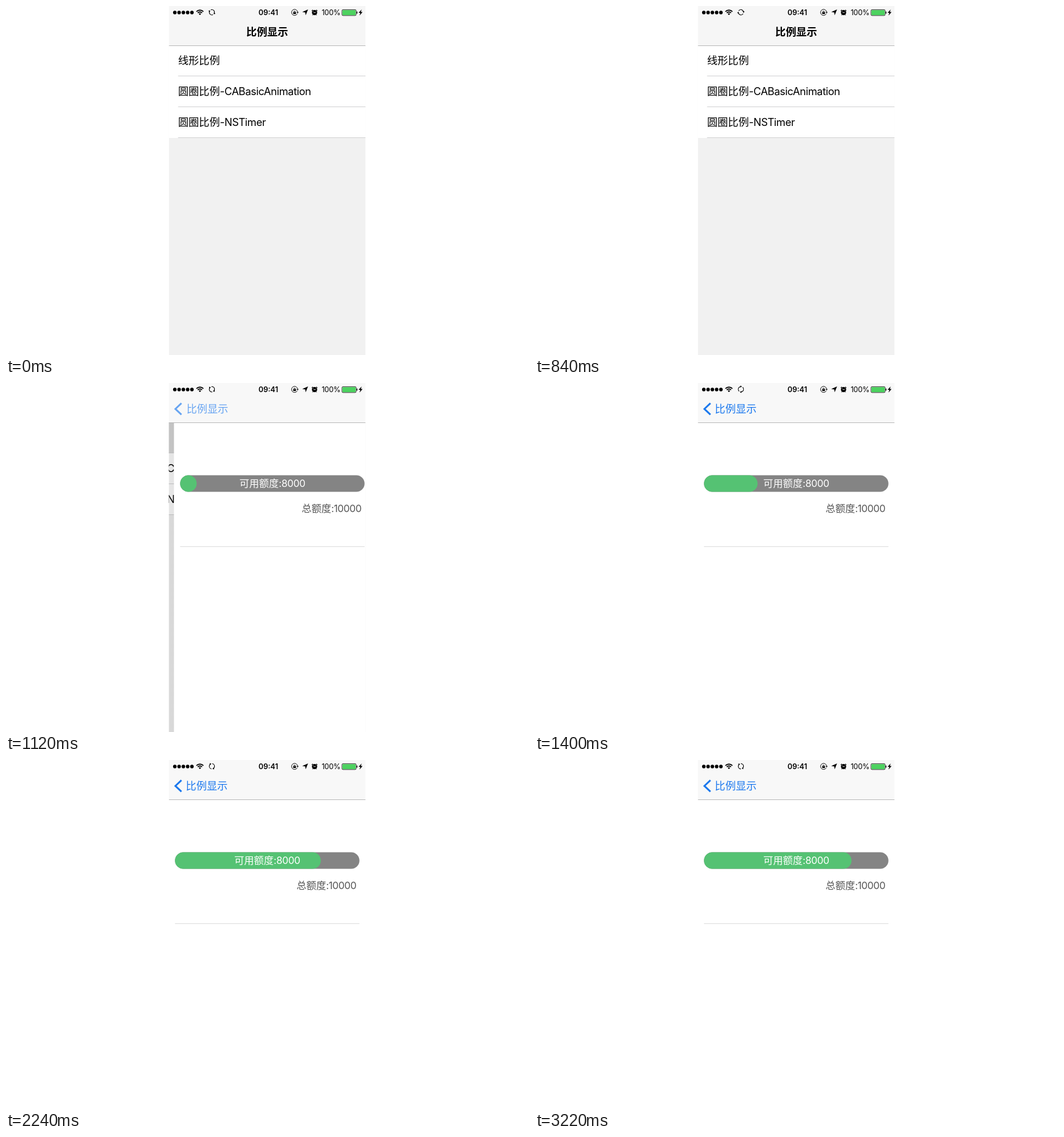
An HTML page with a canvas that plays this animation: 917 by 611 pixels, repeating every 3360 ms.

```html
<!DOCTYPE html>
<html lang="zh-CN">
<head>
<meta charset="utf-8">
<style>
html, body { margin: 0; width: 100%; height: 100%; overflow: hidden; background: #fff; }
canvas { display: block; width: 917px; height: 611px; }
</style>
</head>
<body>
<canvas id="stage"></canvas>
<script>
const W = 917, H = 611, TAU = Math.PI * 2;
const LEFT = 285.5, WIDTH = 345, NAV = 69;
const STEP = 140, COUNT = 24, PUSH = 7, SETTLED = 3;
const FONT = 'Inter, "Noto Sans CJK SC", "Noto Sans CJK", sans-serif';
const BLUE = '#1b78ee', GREEN = '#55c273';
const ROWS = ['线形比例', '圆圈比例-CABasicAnimation', '圆圈比例-NSTimer'];
// Fill width of the bar on each step after the push begins
const FILL = [18, 29, 58, 94, 131, 160, 200, 231, 245.5, 255.7, 258.7];
const BACK_ALPHA = [0.12, 0.65, 0.95, 1];

const canvas = document.getElementById('stage');
const ctx = canvas.getContext('2d');
const dpr = window.devicePixelRatio || 1;
canvas.width = W * dpr;
canvas.height = H * dpr;

const pick = (list, i) => list[Math.min(i, list.length - 1)];

function rect(x, y, w, h, color) {
  ctx.fillStyle = color;
  ctx.fillRect(x, y, w, h);
}

function pill(x, y, w, h, radii, color) {
  ctx.beginPath();
  ctx.roundRect(x, y, w, h, radii);
  ctx.fillStyle = color;
  ctx.fill();
}

function disc(x, y, r, color) {
  ctx.beginPath();
  ctx.arc(x, y, r, 0, TAU);
  ctx.fillStyle = color;
  ctx.fill();
}

function arc(x, y, r, from, to, width) {
  ctx.beginPath();
  ctx.arc(x, y, r, from, to);
  ctx.lineWidth = width;
  ctx.stroke();
}

function poly(points, color) {
  ctx.beginPath();
  points.forEach(([x, y]) => ctx.lineTo(x, y));
  ctx.closePath();
  ctx.fillStyle = color;
  ctx.fill();
}

function line(points, width) {
  ctx.beginPath();
  points.forEach(([x, y]) => ctx.lineTo(x, y));
  ctx.lineWidth = width;
  ctx.stroke();
}

// Latin runs are set a little tighter than Chinese ones; align: 0 left, 0.5 centre, 1 right
function text(str, x, y, size, color, { weight = 400, align = 0, tight = -0.023 } = {}) {
  ctx.font = `${weight} ${size}px ${FONT}`;
  ctx.fillStyle = color;
  const runs = str.match(/[\u4e00-\u9fff]+|[^\u4e00-\u9fff]+/g).map(s => {
    const spacing = s.charCodeAt(0) < 0x4e00 ? `${tight * size}px` : '0px';
    ctx.letterSpacing = spacing;
    return { s, spacing, w: ctx.measureText(s).width };
  });
  x -= align * runs.reduce((sum, run) => sum + run.w, 0);
  for (const run of runs) {
    ctx.letterSpacing = run.spacing;
    ctx.fillText(run.s, x, y);
    x += run.w;
  }
  ctx.letterSpacing = '0px';
}

function spinner(x, y, angle) {
  ctx.save();
  ctx.translate(x, y);
  ctx.rotate(angle);
  for (let i = 0; i < 2; i++) {
    arc(0, 0, 4.6, -1.3, 1.15, 1.2);
    poly([[0.3, 4.6], [2.9, 2.3], [3.2, 5.9]], '#000');
    ctx.rotate(Math.PI);
  }
  ctx.restore();
}

function wifi(x, y) {
  const a = -Math.PI * 0.75, b = -Math.PI * 0.25;
  arc(x, y, 8.6, a, b, 1.9);
  arc(x, y, 5.4, a, b, 1.8);
  ctx.beginPath();
  ctx.moveTo(x, y);
  ctx.arc(x, y, 3, a, b);
  ctx.fillStyle = '#000';
  ctx.fill();
}

function rotationLock(x, y) {
  arc(x, y, 5.3, 0.5, TAU - 0.2, 1);
  poly([[x + 3.4, y - 0.6], [x + 7.2, y - 0.6], [x + 5.3, y + 1.8]], '#000');
  rect(x - 2.4, y - 0.5, 4.8, 3.4, '#000');
  arc(x, y - 0.6, 1.5, Math.PI, TAU, 1);
}

function alarm(x, y) {
  disc(x, y, 4.6, '#000');
  arc(x, y, 5.6, -2.6, -2.1, 1.1);
  arc(x, y, 5.6, -1.04, -0.54, 1.1);
  line([[x - 2.6, y + 3.4], [x - 3.5, y + 4.8]], 1);
  line([[x + 2.6, y + 3.4], [x + 3.5, y + 4.8]], 1);
  ctx.strokeStyle = '#f7f7f7';
  line([[x - 2.4, y - 1.6], [x, y + 0.4], [x + 2.2, y - 0.8]], 0.9);
  ctx.strokeStyle = '#000';
}

function battery(x, y) {
  ctx.beginPath();
  ctx.roundRect(x + 0.4, y + 0.4, 25, 10.4, 2);
  ctx.lineWidth = 0.8;
  ctx.stroke();
  pill(x + 1.3, y + 1.3, 23.2, 8.6, 1, '#4cd25f');
  pill(x + 26, y + 3.6, 1.5, 4, [0, 1.2, 1.2, 0], '#000');
}

function statusBar(n) {
  ctx.strokeStyle = '#000';
  for (let i = 0; i < 5; i++) disc(296 + i * 7.5, 11.4, 3.1, '#000');
  wifi(340, 15.9);
  spinner(361, 11, (n - 1.6) * 24.5 * Math.PI / 180);
  text('09:41', 460, 16, 12.9, '#000', { weight: 600, align: 0.5, tight: 0 });
  rotationLock(506, 11.2);
  poly([[529.6, 6], [525.4, 16.2], [524.6, 11.2], [519.4, 10.6]], '#000');
  alarm(541, 11.5);
  text('100%', 586.4, 16, 12.9, '#000', { align: 1 });
  battery(588.6, 6);
  poly([[623.6, 6], [618.2, 12], [621.2, 12], [619.8, 16.8], [625.2, 10.4], [622.2, 10.4]], '#000');
}

function navBar(n) {
  rect(LEFT, 0, WIDTH, NAV, n < PUSH ? '#f6f6f6' : '#f8f8f8');
  rect(LEFT, NAV, WIDTH, 1, '#b6b6b6');
  const step = n - PUSH;
  if (step < 0) {
    text('比例显示', 458, 52.3, 18.33, '#000', { weight: 700, align: 0.5 });
    return;
  }
  const x = 315.3 + 32.5 * Math.exp(-3.4 * step);
  if (step === 0) {
    ctx.globalAlpha = 0.17;
    text('比例显示', x, 52.3, 18.33, '#000', { weight: 700 });
  }
  ctx.globalAlpha = pick(BACK_ALPHA, step);
  ctx.strokeStyle = BLUE;
  line([[307.6, 35.4], [297, 45.4], [307.6, 55.4]], 3.1);
  text('比例显示', x, 52.3, 18.33, BLUE);
  ctx.globalAlpha = 1;
}

function listPage(shift, selected, dim) {
  const x = LEFT + shift, rowH = 53.9;
  const edge = i => Math.round(NAV + i * rowH);
  rect(x, NAV, WIDTH, H - NAV, '#f1f1f1');
  ROWS.forEach((label, i) => {
    const y = edge(i);
    rect(x, y, WIDTH, edge(i + 1) - y, selected && i === 0 ? '#d9d9d9' : '#fff');
    text(label, x + 16.2, NAV + i * rowH + 33.2, 18.33, '#000');
  });
  ROWS.forEach((_, i) => rect(x + 16.2, edge(i + 1) - 1, WIDTH - 16.2, 1, '#cfcfd0'));
  rect(LEFT, NAV, WIDTH, H - NAV, `rgba(0,0,0,${dim})`);
}

function detailPage(shift, fill) {
  const x = LEFT + shift, bar = x + 10.8, barW = 323.4, y = 161.5, h = 29;
  if (shift > 0) {
    const shade = ctx.createLinearGradient(x - 9, 0, x, 0);
    shade.addColorStop(0, 'rgba(0,0,0,0)');
    shade.addColorStop(1, `rgba(0,0,0,${Math.min(0.07, shift / 1000)})`);
    rect(x - 9, NAV, 9, H - NAV, shade);
  }
  rect(x, NAV, WIDTH, H - NAV, '#fff');
  pill(bar, y, barW, h, h / 2, '#848484');
  pill(bar, y, fill, h, { x: Math.min(h, fill) / 2, y: h / 2 }, GREEN);
  text('可用额度:8000', bar + barW / 2, 182.2, 17.25, '#fff', { align: 0.5 });
  text('总额度:10000', bar + barW - 5.4, 225.7, 17.25, '#555', { align: 1 });
  rect(bar, 286, barW, 1, '#dadada');
}

function draw(n) {
  ctx.setTransform(dpr, 0, 0, dpr, 0, 0);
  rect(0, 0, W, H, '#fff');
  ctx.save();
  ctx.beginPath();
  ctx.rect(LEFT, 0, WIDTH, H);
  ctx.clip();
  const step = n - PUSH;
  const rest = step < 0 ? 1 : step < SETTLED ? 0.274 * Math.exp(-2.35 * step) : 0;
  const done = 1 - rest;
  if (rest > 0) listPage(-0.3 * WIDTH * done, step >= 0, 0.1 * done);
  if (step >= 0) detailPage(WIDTH * rest, pick(FILL, step));
  navBar(n);
  statusBar(n);
  ctx.restore();
}

const start = performance.now();
function tick() {
  const elapsed = Math.max(0, performance.now() - start);
  draw(Math.floor(elapsed / STEP) % COUNT);
  requestAnimationFrame(tick);
}
tick();
</script>
</body>
</html>
```
